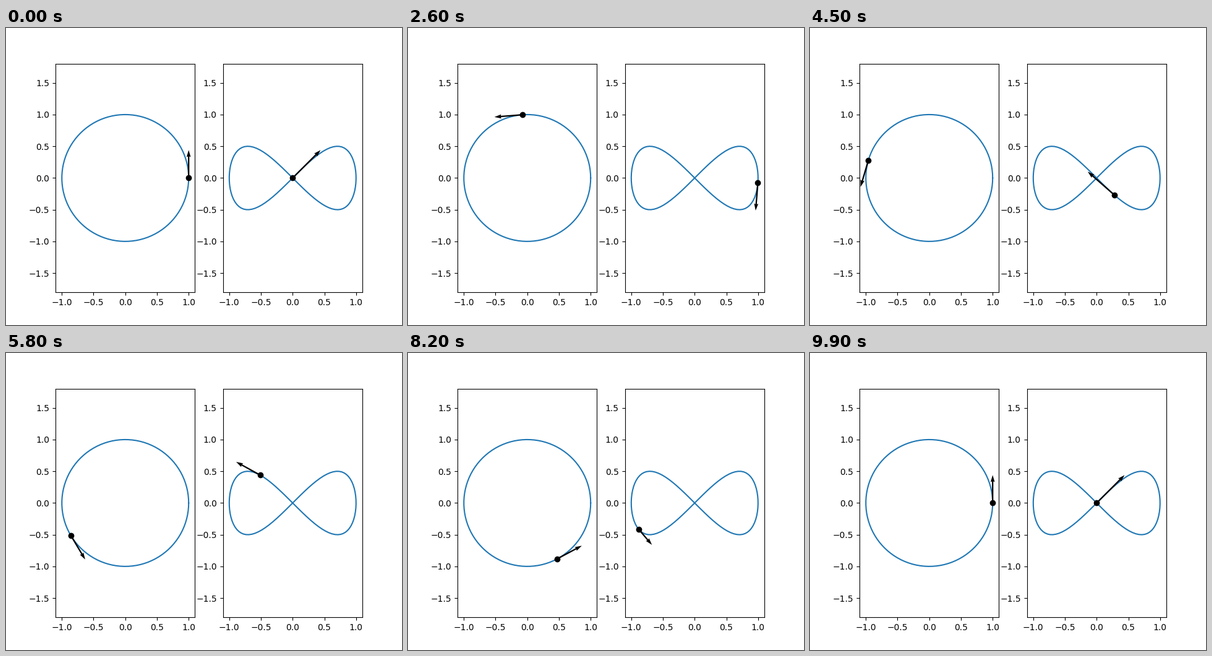
Recreate the animation shown at these times as a matplotlib script. Size 640x480 px, loop 10000 ms.

```python
import numpy as np
import matplotlib.pyplot as plt
from matplotlib.animation import FuncAnimation

FRAMES = 100
t = np.linspace(0, 2 * np.pi, FRAMES)

# position and velocity of each curve
curves = [
    ((np.cos(t), np.sin(t)), (-np.sin(t), np.cos(t))),
    ((np.sin(t), np.sin(t) * np.cos(t)), (np.cos(t), np.cos(2 * t))),
]

fig, axes = plt.subplots(1, 2, figsize=(6.4, 4.8), dpi=100)


def make_panel(ax, pos, vel):
    ax.plot(*pos)
    ax.set_xlim(-1.1, 1.1)
    ax.set_aspect("equal", adjustable="datalim")
    dot, = ax.plot(pos[0][:1], pos[1][:1], "ko", zorder=4)
    arrow = ax.quiver(pos[0][:1], pos[1][:1], vel[0][:1], vel[1][:1],
                      scale=5, width=0.01, color="k", zorder=3)
    return dot, arrow


panels = [make_panel(ax, *curve) for ax, curve in zip(axes, curves)]


def update(i):
    for (dot, arrow), ((x, y), (u, v)) in zip(panels, curves):
        dot.set_data([x[i]], [y[i]])
        arrow.set_offsets([[x[i], y[i]]])
        arrow.set_UVC([u[i]], [v[i]])
    return [artist for panel in panels for artist in panel]


anim = FuncAnimation(fig, update, frames=FRAMES, interval=100,
                     repeat=True, repeat_delay=0, blit=False)
plt.show()
```
